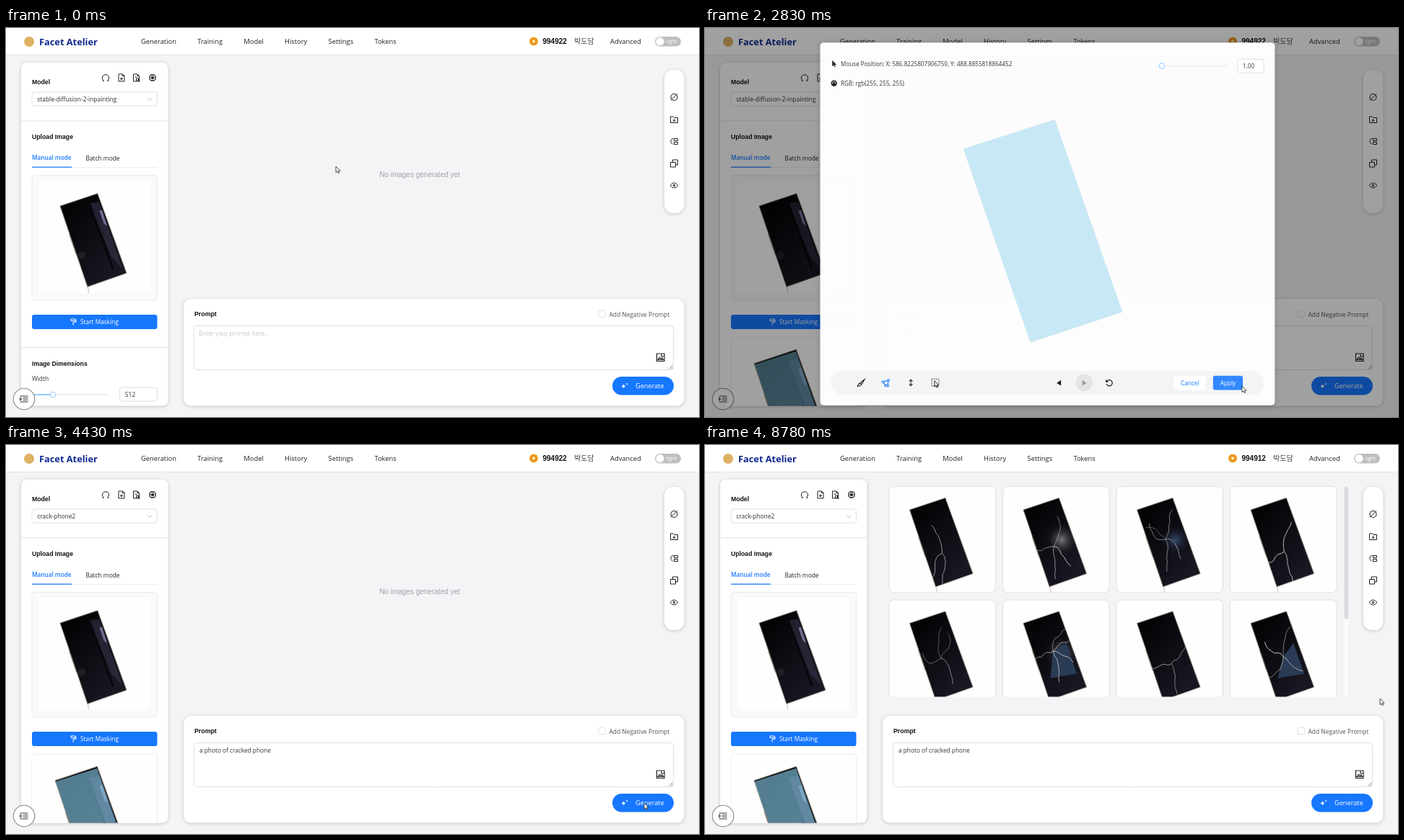
These frames come from a looping animation (960x540 px, 8.83 s). An HTML page with a canvas:

```html
<!DOCTYPE html>
<html lang="en">
<head>
<meta charset="utf-8">
<title>Image generation workspace</title>
<style>
html, body { margin: 0; width: 100%; height: 100%; overflow: hidden; background: #f3f4f6; }
canvas { display: block; }
</style>
</head>
<body>
<canvas id="stage" width="960" height="540"></canvas>
<script>
const c = document.getElementById('stage').getContext('2d');
const LOOP = 8830, STEP = 100 / 3;
const BLUE = '#1677ff', INK = '#1f1f1f', GREY = '#d9d9d9', SKY = '135,206,235';
const UI = '"Open Sans", "Noto Sans", sans-serif', ARIAL = '"Liberation Sans", Arial, sans-serif';
const CJK = '"Noto Sans CJK KR", "Noto Sans CJK", sans-serif', SYMBOL = '"DejaVu Sans", sans-serif';

const clamp = v => Math.max(0, Math.min(1, v));
const easeInOut = p => p < .5 ? 4 * p ** 3 : 1 - 4 * (1 - p) ** 3;
const easeOut = p => 1 - (1 - p) ** 7;
const mix = (a, b, p) => a * (1 - p) + b * p;

// ---- drawing helpers ----
function text(s, x, y, size = 8.4, color = '#333', weight = 400, align = 'left', font = UI) {
  c.font = `${weight} ${size}px ${font}`;
  c.textAlign = align;
  c.fillStyle = color;
  c.fillText(s, x, y + size * .36);
}
const bold = (s, x, y, size = 8.7) => text(s, x, y, size, '#111', 700, 'left', ARIAL);
const symbol = (s, x, y, size, color = INK) => text(s, x, y, size, color, 400, 'center', SYMBOL);

function box(x, y, w, h, r, fill, stroke, shadow = 0) {
  c.beginPath();
  c.roundRect(x, y, w, h, r);
  if (shadow) { c.shadowColor = 'rgba(0,0,0,.2)'; c.shadowBlur = shadow; c.shadowOffsetY = 1; }
  if (fill) { c.fillStyle = fill; c.fill(); }
  c.shadowColor = 'transparent';
  if (stroke) { c.strokeStyle = stroke; c.lineWidth = .8; c.stroke(); }
}
function disc(x, y, r, fill, stroke) {
  c.beginPath();
  c.arc(x, y, r, 0, 7);
  if (fill) { c.fillStyle = fill; c.fill(); }
  if (stroke) { c.strokeStyle = stroke; c.lineWidth = 1.1; c.stroke(); }
}
function trace(pts) {
  c.beginPath();
  pts.forEach(([x, y]) => c.lineTo(x, y));
}
function poly(pts, fill) { trace(pts); c.fillStyle = fill; c.fill(); }
function line(pts, color, lw = 1) { trace(pts); c.strokeStyle = color; c.lineWidth = lw; c.stroke(); }
const rule = (x1, x2, y, color, lw) => line([[x1, y], [x2, y]], color, lw);

// Icon paths are centred on 0,0.
function icon(x, y, d, color = INK, fill = false, lw = 1) {
  c.save();
  c.translate(x, y);
  c.lineWidth = lw;
  c.fillStyle = c.strokeStyle = color;
  c[fill ? 'fill' : 'stroke'](new Path2D(d));
  c.restore();
}
function clipped(x, y, w, h, r, draw) {
  c.save();
  c.beginPath();
  c.roundRect(x, y, w, h, r);
  c.clip();
  draw();
  c.restore();
}
function input(s, x, y, w, h = 19) {
  box(x, y, w, h, 3, '#fff', GREY);
  text(s, x + 7.3, y + h / 2 + .3);
}
function slider(x, y, w, value) {
  rule(x, x + w, y, '#efefef', 2);
  rule(x, x + value, y, '#91caff', 2);
  disc(x + value, y, 3.8, '#fff', '#91caff');
}

const PAGE = 'M-4 -5H1.5L4 -2.5V5H-4ZM1.5 -5V-2.5H4';
const ARROW = 'M0 0V8.5L2 6.8L3.3 9.6L4.7 9L3.4 6.2H6Z';
const HALF = 'M-5 -7.5H5M-4 -7.5V-4.5L-.8 0M4 -7.5V-4.5L.8 0';
const TOOLS = [
  'M-5 -4H-1L.5 -2.5H5V4.5H-5ZM0 -1V2.5M-1.8 1L0 2.8L1.8 1',
  'M-1 -4Q-5 -4 -4.5 1L-2 4M0 -4H5V-1H0ZM0 1H5V4H0Z',
  'M-5 -1.5H2V5H-5ZM-2 -1.5V-5H5V2H2',
  'M-5.5 0Q0 -7 5.5 0Q0 7 -5.5 0M-1 -1H1V1H-1Z'];

// ---- phone picture, in a unit square ----
const BODY = [[.193, .22], [.528, .108], [.787, .821], [.438, .944]];
const MASK = [[.196, .228], [.438, .929], [.771, .818], [.526, .122]];
const place = (pts, x, y, s) => pts.map(([u, v]) => [x + u * s, y + v * s]);
// A spot on the glass: a runs across the screen, b runs down it.
const onGlass = (a, b) => [.193 + .335 * a + .25 * b, .22 - .112 * a + .72 * b];
const patch = spots => spots.map(([a, b]) => onGlass(a, b));

function random(seed) {
  return () => (seed = seed * 16807 % 2147483647) / 2147483647;
}
function haze([x, y], r, color) {
  const g = c.createRadialGradient(x, y, 0, x, y, r);
  g.addColorStop(0, color);
  g.addColorStop(1, 'rgba(0,0,0,0)');
  disc(x, y, r, g);
}

// Cracks wander out from one hub; some phones also get a glow or a blue splinter.
function damage(i) {
  const next = random(7919 * (i + 3)), hub = onGlass(.4 + .2 * next(), .4 + .25 * next());
  if (i % 4 === 1 || i === 2) haze(onGlass(.7, .5), .17, i === 2 ? 'rgba(70,95,140,.7)' : 'rgba(190,190,195,.6)');
  if (i > 4 && i % 2) poly([hub, onGlass(.9, .4), onGlass(.9, .8), onGlass(.2, .75)], '#2a3b55');
  const arms = 3 + i % 3;
  for (let k = 0; k < arms; k++) {
    let [x, y] = hub, angle = (k + .6 * next()) / arms * 2 * Math.PI;
    const path = [hub];
    for (let n = 0; n < 7; n++) {
      angle += (next() - .5) * 1.2;
      x += Math.cos(angle) * .03;
      y += Math.sin(angle) * .045;
      path.push([x, y]);
    }
    line(path, i % 2 ? '#e0dcd8' : '#a9a7a6', .003 + .003 * next());
  }
}
function reflection() {
  poly(patch([[.72, .08], [.97, .1], [.97, .93], [.8, .75]]), 'rgba(64,56,84,.5)');
  poly(patch([[.9, .2], [.97, .2], [.96, .4], [.9, .36]]), '#6f6c90');
  line(patch([[.72, .05], [.74, .9]]), '#07070b', .018);
  disc(.385, .66, .035, 'rgba(90,90,100,.22)');
}

function phone(x, y, s, inside = reflection) {
  c.save();
  c.translate(x, y);
  c.scale(s, s);
  c.fillStyle = '#fefefe';
  c.fillRect(0, 0, 1, 1);
  line([[.44, .94], [.452, 1]], '#e5d9d0', .012);
  line([[.28, .47], [.345, .66]], '#a08f84', .018);
  const dark = c.createLinearGradient(.25, .3, .75, .7);
  dark.addColorStop(0, '#040406');
  dark.addColorStop(1, '#181722');
  poly(BODY, dark);
  c.save();
  c.clip();
  inside();
  c.restore();
  line([...BODY, BODY[0]], '#8f877c', .006);
  c.restore();
}

// ---- cursor: glides along a slight arc to each stop, arriving at its time ----
const GLIDE = 240, FIRST = 1005, EVERY = 250;
const corners = place(MASK, 285, 75, 390);
const STOPS = [
  [0, 457, 192], [330, 129, 410], [700, 252, 493],
  ...[...corners, corners[0]].map((p, i) => [FIRST + EVERY * i, ...p]),
  [2680, 744, 497], [3220, 180, 68], [3640, 622, 207], [4000, 632, 454], [4420, 884, 497], [5000, 935, 352]];

function cursorAt(t) {
  const i = STOPS.findIndex(([at]) => at > t);
  if (i < 0) return STOPS.at(-1).slice(1);
  const [at, x, y] = STOPS[i], [, px, py] = STOPS[i - 1];
  const p = clamp((t - at + GLIDE) / GLIDE), e = p * p * (3 - 2 * p);
  const dx = x - px, dy = y - py, bow = .27 * Math.sin(Math.PI * e);
  return [px + dx * e + dy * bow, py + dy * e - dx * bow];
}

// ---- page ----
function header(done) {
  c.fillStyle = '#fff';
  c.fillRect(0, 0, 960, 37);
  rule(0, 960, 37.5, '#e3e5e8');
  disc(32, 19, 7, '#dfb162');
  text('Facet Atelier', 46, 19, 12.8, '#10298e', 700);
  let x = 187;
  for (const s of ['Generation', 'Training', 'Model', 'History', 'Settings', 'Tokens']) {
    text(s, x, 19, 9.35, '#222');
    x += c.measureText(s).width + 29.3;
  }
  disc(731, 18.5, 6, '#f0a020');
  disc(731, 18.5, 3, '#ffdf98', '#d97f0c');
  bold(done ? '994912' : '994922', 743.5, 18.5, 10);
  text('박도담', 787, 18, 10, '#444', 400, 'left', CJK);
  text('Advanced', 837, 19, 9.4, '#222');
  box(899, 12, 36, 13.5, 7, '#bfbfbf');
  disc(906, 18.7, 5.6, '#fff');
  text('light', 914.5, 18.5, 7.2, '#fff');
}

function sidebar(applied, loaded) {
  box(21, 48, 203.5, 476.5, 8, '#fff', null, 5);
  bold('Model', 36, 74.5);
  icon(138, 69, 'M-2.5 4.2A4.6 4.6 0 1 1 2.5 4.2M-4.5 4.2h2.3M4.5 4.2h-2.3');
  icon(160, 69, PAGE + 'M-2 1.5H2M0 -.5V3.5');
  icon(180.5, 69, PAGE + 'M-2 -1H1M0 1H3V4H0ZM3 4L5 6');
  box(199.5, 65.5, 7, 7, 1, null, INK);
  for (let a = -2; a <= 2; a += 2) icon(203, 69, `M${a} -5V-3M${a} 3V5M-5 ${a}H-3M3 ${a}H5M-1 -1H1V1H-1Z`, INK, false, 1.2);
  input(loaded ? 'crack-phone2' : 'stable-diffusion-2-inpainting', 36, 89, 173.5);
  icon(199, 99, 'M-3 -1.5L0 1.5L3 -1.5', '#bbb');
  rule(21, 224, 129, '#e2e3e6');
  bold('Upload Image', 36, 151);
  text('Manual mode', 36, 180.5, 8.2, BLUE, 600);
  text('Batch mode', 110.5, 180.5, 8.4, '#222', 500);
  rule(36, 209.5, 193.5, '#eee');
  rule(36, 91, 193.2, BLUE, 1.2);
  box(36, 204.5, 173.5, 173.5, 4, '#fafafa', '#e6e6e6');
  phone(45, 213, 155);
  box(36, 398, 173.5, 20, 3, BLUE);
  icon(93, 408, 'M-3 -4H3V-1.5H-3ZM3 -2.8H4V.3H0V4.5', '#fff');
  text('Start Masking', 103, 408, 8.35, '#fff');
  if (applied) {
    clipped(21, 420, 203, 104.5, [0, 0, 8, 8], () => {
      box(36, 429, 173.5, 173.5, 4, '#fff', '#e6e6e6');
      clipped(36.5, 429.5, 172.5, 172, 4, () => {
        phone(34.5, 427.5, 174);
        poly(place(MASK, 34.5, 427.5, 174), `rgba(${SKY},.6)`);
      });
    });
  } else {
    rule(21, 224, 443.5, '#e2e3e6');
    bold('Image Dimensions', 36, 465.5);
    text('Width', 36, 487);
    slider(36, 509, 107, 29);
    input('512', 157.5, 499, 52);
  }
  disc(25, 515, 14.8, '#fff', '#8a8a8a');
  icon(25, 515, 'M-5.5 -4H5.5M-1.5 -1.3H5.5M-1.5 1.3H5.5M-5.5 4H5.5M-5.5 -2L-3 0L-5.5 2Z', '#333');
}

function toolbar() {
  box(912, 58, 27.5, 199, 12, '#fff', null, 5);
  disc(925.5, 96, 4.5, null, INK);
  line([[921, 100.5], [930, 91.5]], INK);
  TOOLS.forEach((d, i) => icon(925.5, 127 + 30.5 * i, d));
}

function promptCard(loaded, busy) {
  box(246, 376, 693.5, 148.5, 10, '#fff', null, 5);
  bold('Prompt', 261, 396.5, 8.8);
  box(821, 392, 9.5, 9.5, 2, '#fff', GREY);
  text('Add Negative Prompt', 835.5, 397.5, 8.45, '#555');
  box(260.5, 413.5, 664, 61, 4, '#fff', GREY);
  if (loaded) text('a photo of cracked phone', 268, 424, 8.3);
  else text('Enter your prompt here...', 267.5, 424, 8.2, '#c4c4c4');
  icon(907, 457, 'M0 -5H-5.5V5.5H5V1M-4 3.5L-1.5 .5L.5 2.5L2 1L3.5 3.5ZM1 -5H5V-1H1ZM4.5 -1.5L6 .5', INK, false, 1.2);
  icon(921, 471, 'M-2.5 2.5L2.5 -2.5M.5 2.5L2.5 .5', '#888');
  box(840, 484, 85, 25.5, 12.7, busy ? '#f5f5f5' : BLUE);
  const ink = busy ? '#bcbcbc' : '#fff';
  symbol('✦', 855.5, 497.5, 10, ink);
  symbol('✦', 860, 494, 5, ink);
  text('Generate', 872, 497, 9.2, ink, 500);
}

function gallery(t, done) {
  clipped(250, 50, 645, 299.5, 0, () => {
    for (let i = 0; i < 8; i++) {
      const x = 255 + i % 4 * 157.5, y = 57.5 + (i >> 2) * 157.5;
      if (done) clipped(x, y, 147.5, 147.5, 7, () => phone(x, y, 147.5, () => damage(i)));
      box(x, y, 147.5, 147.5, 7, done ? null : '#e9eaec', done ? '#d8dadd' : '#dcdee1');
      if (done) continue;
      c.save();
      c.translate(x + 73.3, y + 75.7);
      c.rotate((t - 5533) / 1000 * 2 * Math.PI);
      icon(0, 0, HALF + 'M-2 -4H2', '#777', false, 1.2);
      c.scale(1, -1);
      icon(0, 0, HALF + 'M-2.5 -5.5L0 -3L2.5 -5.5Z', '#777', false, 1.2);
      c.restore();
    }
    box(885.5, 57.5, 5.5, 300, 0, '#fcfcfc');
    box(885.5, 57.5, 5.5, 184.5, 2.7, '#d9dade');
  });
}

// ---- dialogs ----
// Zooms from and back to the clicked point (ox, oy) over a fading backdrop.
function modal(t, open, close, ox, oy, draw) {
  const p = clamp((t - open) / 90), q = clamp((t - close) / 90);
  if (!p || q === 1) return;
  const e = easeOut(p) * (1 - easeInOut(q)), s = .2 + .8 * e;
  c.fillStyle = `rgba(0,0,0,${.45 * p ** .6 * (1 - q)})`;
  c.fillRect(0, 0, 960, 540);
  c.save();
  c.globalAlpha = e;
  c.translate(ox, oy);
  c.scale(s, s);
  c.translate(-ox, -oy);
  draw();
  c.restore();
}
function button(s, x, y, w, color = '#fff', ink = '#333') {
  box(x, y, w, 20, 3, color, color === '#fff' ? GREY : null);
  text(s, x + w / 2, y + 10, 8.35, ink, 400, 'center');
}

function maskDialog(t) {
  const drift = clamp((t - 1240) / 1300), filled = t >= FIRST + 4 * EVERY;
  const x = mix(187.07966587960348, 586.8225807906759, drift);
  const y = mix(239.04626006702495, 488.8855818864452, drift);
  box(160, 14, 640, 511.5, 5, '#fff', null, 8);
  icon(177, 39, ARROW, INK, true);
  text(`Mouse Position: X: ${x}, Y: ${y}`, 189, 44, 8.25);
  disc(179.5, 71.5, 4.3, INK);
  for (let a = 0; a < 4; a++) disc(179.5 - 2.3 * Math.cos(a), 71.5 - 2.3 * Math.sin(a), .8, '#fff');
  text(`RGB: rgb(${Array(3).fill(filled ? 255 : 12).join(', ')})`, 189, 72, 8.25);
  slider(641, 47, 93, 0);
  input('1.00', 747.5, 37.5, 37);
  if (t < 2800) phone(285, 75, 390);
  if (filled) poly(corners, `rgba(${SKY},.45)`);
  else {
    const clicked = corners.slice(0, Math.max(0, Math.floor((t - FIRST) / EVERY) + 1));
    line(clicked, '#00f');
    clicked.forEach(([px, py]) => disc(px, py, 2.8, '#00f'));
  }

  box(175, 477, 610, 34, 17, '#f3f4f6');
  const drawing = t > 700, tool = drawing ? BLUE : INK;
  icon(217.5, 494, 'M5 -5L-1 0L1 2ZM-1 .5Q-4 1 -5 5Q-1 5 .5 2', drawing ? INK : BLUE, false, 1.1);
  const knots = [[248.5, 492.5], [256, 490.5], [255, 498], [252, 497.5]];
  line([...knots, knots[0]], tool, 1.2);
  knots.forEach(([kx, ky]) => disc(kx, ky, 1.4, '#f3f4f6', tool));
  symbol('↕', 287.5, 494, 13);
  c.setLineDash([2, 1]);
  box(317, 488.5, 10, 10, 0, null, INK);
  c.setLineDash([]);
  icon(321, 491, ARROW, INK);
  if (!filled) disc(496.5, 494, 12, '#e2e3e5');
  disc(531.5, 494, 12, '#e2e3e5');
  icon(496.5, 494, 'M2.5 -4L-3.5 0L2.5 4Z', filled ? '#111' : '#999', true);
  icon(531.5, 494, 'M-2.5 -4L3.5 0L-2.5 4Z', '#999', true);
  icon(567, 494, 'M-3.6 -2A4.2 4.2 0 1 1 -4 1.5M-4.5 -4.5V-1.5H-1.5', INK, false, 1.3);
  button('Cancel', 658, 484, 45, '#fefefe', BLUE);
  button('Apply', 713, 484, 42, t > 2640 ? '#2f86ff' : '#4096ff', '#fff');
}

function presetList() {
  text('Load Preset', 317.5, 73.4, 11.7, '#222', 500);
  text("Select a preset from the list, review its details, and click 'Load' to apply it.", 317.5, 95.2, 8.3, '#aaa');
  box(317.5, 121.4, 325.3, 35.5, [4, 4, 0, 0], '#f0f1f2');
  const rows = [['No.', 'Preset Name', 'Date'], ['1', 'small_scratch_phone', '2024-10-10 03:48'],
    ['2', 'cracked phone3', '2024-10-09 12:07']];
  rows.forEach(([no, name, date], i) => {
    const y = 139.2 + 34.8 * i, weight = i ? 400 : 500;
    text(no, 327.3, y, 8.3, '#333', weight);
    text(name, 352.4, y, 8.3, '#333', weight);
    text(date, 530.9, y, 8.3, '#333', weight);
    if (!i) return;
    icon(620, y, 'M-3.8 -3.8H3.8V3.8H-3.8ZM-2 0H2', '#666');
    rule(317.5, 642.8, y + 17.6, '#ececec');
  });
  text('1 / 1', 480, 254, 8.3, '#333', 400, 'center');
  symbol('‹', 457, 254, 10, '#ccc');
  symbol('›', 503, 254, 10, '#ccc');
  button('Cancel', 597, 442.4, 45.8);
}
function presetDetail() {
  text('cracked phone3', 317.3, 73.2, 11.8, '#222', 600);
  const facts = { Model: 'crack-phone2', Width: 512, Height: 512, 'Batch Count': 2, 'Batch Size': 5,
    'Guidance Scale': 10, Seed: 3292327148, Prompt: 'a photo of cracked phone' };
  Object.entries(facts).forEach(([k, v], i) => {
    const y = 109 + i * 23.85;
    text(k + ':', 317.3, y, 8.36);
    text(v, 643, y, 8.36, '#333', 400, 'right');
  });
  button('Back', 557.5, 442.4, 36.5);
  button('Load', 604.3, 442.4, 38.5, '#1068e4', '#fff');
}

function tooltip(t) {
  c.globalAlpha = clamp((t - 3240) / 60) * clamp((3480 - t) / 60);
  box(153, 34, 55, 21.5, 4, '#262626');
  poly([[177, 55], [184, 55], [180.5, 59]], '#262626');
  text('Load Preset', 180.5, 45, 8.2, '#fff', 400, 'center');
  c.globalAlpha = 1;
}

function draw(t) {
  const applied = t >= 2800, loaded = t >= 4070, done = t >= 8250, busy = t >= 4590 && !done;
  c.fillStyle = '#f3f4f6';
  c.fillRect(0, 0, 960, 540);
  header(done);
  sidebar(applied, loaded);
  if (busy || done) gallery(t, done);
  else text('No images generated yet', 573, 203.5, 10, '#a0a3a8', 400, 'center', ARIAL);
  toolbar();
  promptCard(loaded, busy);
  modal(t, 400, 2818, 129, 408, () => maskDialog(t));
  modal(t, 3342, 4079, 181, 69, () => {
    box(292.3, 41, 375.4, 457.7, 5, '#fff', null, 8);
    t < 3700 ? presetList() : presetDetail();
  });
  tooltip(t);
  const [x, y] = cursorAt(t);
  icon(x, y, ARROW, '#fff', true);
  icon(x, y, ARROW, '#222', false, .8);
}

const start = performance.now();
function tick() {
  const t = (performance.now() - start) % LOOP;
  draw(Math.floor((t + 3.4) / STEP) * STEP);
  requestAnimationFrame(tick);
}
tick();
</script>
</body>
</html>
```
